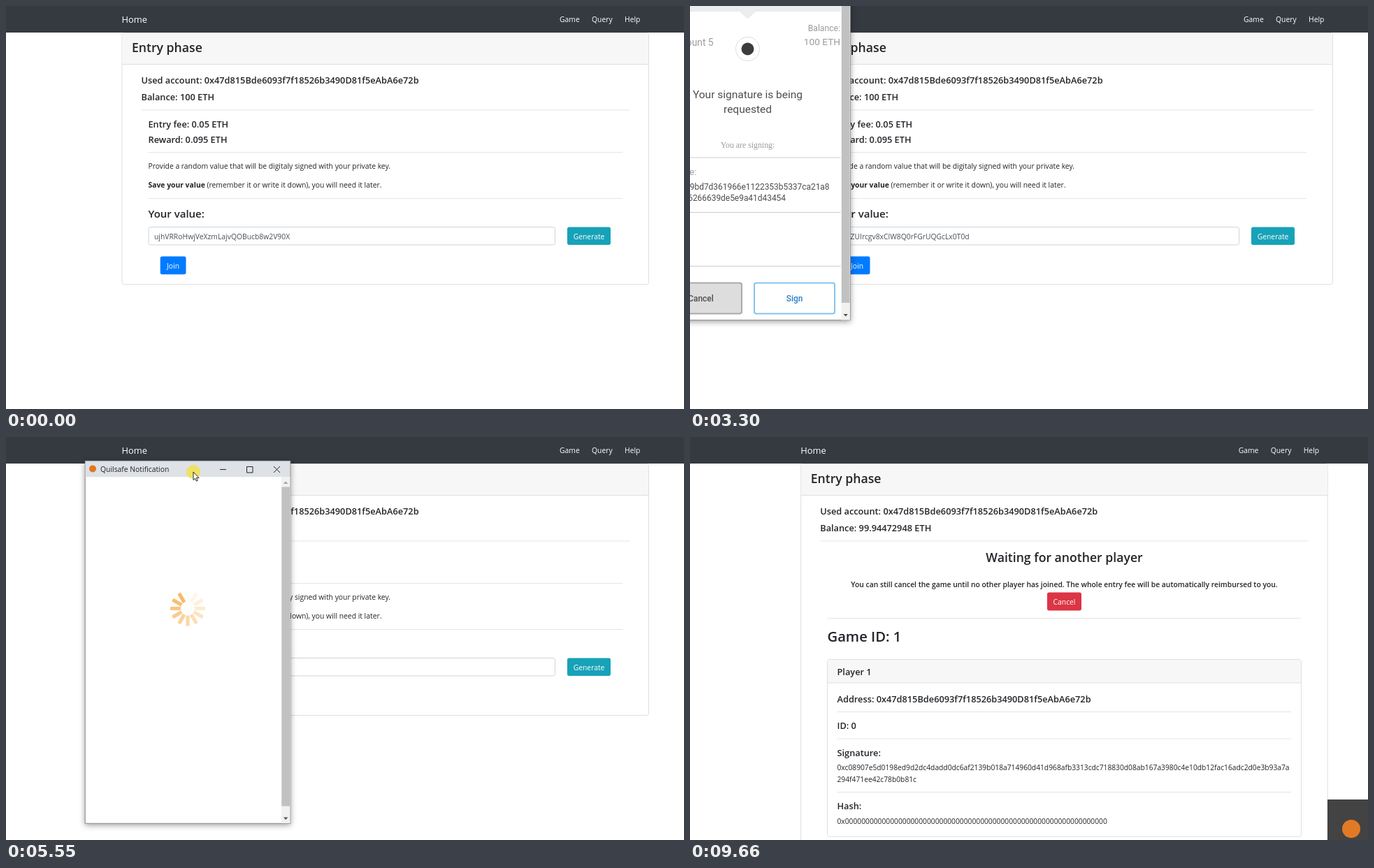
An HTML page that plays this animation: 970 px wide and 577 px high, repeating every 9740 ms.

```html
<!DOCTYPE html>
<html lang="en">
<head>
<meta charset="utf-8">
<title>Entry phase</title>
<style>
html, body { margin: 0; width: 100%; height: 100%; overflow: hidden; background: #fff; }
svg { display: block; width: 970px; height: 577px; }
text { font: 10.35px "Open Sans", "Noto Sans", sans-serif; fill: #212529; white-space: pre; }
.h2 { font-size: 20.2px; font-weight: 600; }
.h3 { font-size: 17.65px; font-weight: 600; }
.h4 { font-size: 15px; font-weight: 600; }
.h5 { font-size: 12.77px; font-weight: 600; }
.h6 { font-weight: 600; }
.hex { font-size: 10.25px; }
.brand { font-size: 12.9px; }
.brand, .light { fill: #fff; }
.field { fill: #495057; }
.bold { font-weight: 700; }
.mid { text-anchor: middle; }
.end { text-anchor: end; }
.panel text { font-family: Roboto, Lato, sans-serif; fill: #4d4d4d; }
.panel .grey { fill: #9b9b9b; }
.panel .serif { font: 11.8px "Liberation Serif", "Noto Serif", serif; fill: #9b9b9b; }
.panel .btn { font-size: 11.9px; font-weight: 500; }
#frame { filter: drop-shadow(0 2px 4px rgba(0, 0, 0, .38)); }
</style>
</head>
<body>
<svg id="stage" viewBox="0 0 970 577"></svg>
<script>
(() => {
const LOOP = 9740;
// Runs of held pictures: start, end, number of pictures
const RUNS = [[100, 2970, 38], [3300, 4910, 22], [5230, 6850, 22], [7170, 9050, 25], [9660, 9660, 1]];
const ADDRESS = '0x47d815Bde6093f7f18526b3490D81f5eAbA6e72b';
const VALUES = [
  [0, 'ujhVRRoHwjVeXzmLajvQOBucb8w2V90X'],
  [700, 'Kd7mTqYwB2sXhRfN0eLzVu5GaPj9CoWi'],
  [1080, 'x3HbZpQ8nUcErT6yMkS1gWvJf4LdAo7D'],
  [1390, 'p5FZUIrcgv8xClW8Q0rFGrUQGcLx0T0d']
];
const POPUPS = [
  { open: 2121, close: 4550, load: 2700, grab: 3300, drop: 3640, x: 64, y: -24.5 },
  { open: 4672, close: 7742, load: 6240, grab: 5250, drop: 5520, x: 113, y: 34 }
];
const START = { x: -64.5, y: -69.5 };
const FADE = 110;
const PATH = [
  [100, 690, 540], [560, 835, 332], [1500, 838, 331], [1760, 520, 392], [2040, 232, 369],
  [2290, 232, 369], [2700, 90.5, -53.5], [3300, 90.5, -53.5], [3640, 219, -8.5], [3980, 285, 490],
  [4070, 285, 490], [4300, 278, 466], [4440, 278, 466], [4700, 90.5, -53.5], [5250, 90.5, -53.5],
  [5520, 268, 50], [5620, 268, 50], [6160, 330, 420], [6850, 340, 470], [7170, 340, 470],
  [7480, 357, 518], [7790, 357, 518], [8100, 900, 430], [8400, 990, 380]
];
const PRESSES = [[700, 790], [1080, 1170], [1390, 1480], [2040, 2120], [3300, 3650], [4330, 4440], [5250, 5610], [7540, 7630]];

const text = (x, y, s, cls = '', extra = '') => `<text x="${x}" y="${y}" class="${cls}" ${extra}>${s}</text>`;
const rect = (x, y, w, h, fill, extra = '') => `<rect x="${x}" y="${y}" width="${w}" height="${h}" fill="${fill}" ${extra}/>`;
const rule = (x1, x2, y, color = '#e4e5e5') => `<path d="M${x1} ${y}H${x2}" stroke="${color}"/>`;
const size = n => `style="font-size:${n}px"`;

function card(x, y, w, h, head) {
  return rect(x, y, w, h, '#fff', 'rx="2.7" stroke="#dfdfdf"') +
    rect(x + .5, y + .5, w - 1, head, '#f7f7f7') + rule(x, x + w, y + head + .5, '#dfdfdf');
}

function pageHead(height, balance) {
  return card(166, 38.5, 753.5, height, 44.5) +
    rect(-10, 0, 990, 38, '#343a40') +
    text(165.5, 24, 'Home', 'brand') +
    text(792, 23, 'Game', 'light') + text(838, 23, 'Query', 'light') + text(885, 23, 'Help', 'light') +
    text(180, 66, 'Entry phase', 'h3') +
    text(193.5, 110.5, 'Used account: ' + ADDRESS, 'h5') +
    text(193.5, 135, `Balance: ${balance} ETH`, 'h5') +
    rule(193.5, 892, 149);
}

function entryForm() {
  return pageHead(360, '100') +
    text(203.5, 173.5, 'Entry fee: 0.05 ETH', 'h5') +
    text(203.5, 195.5, 'Reward: 0.095 ETH', 'h5') +
    rule(203.5, 882, 209.5) +
    text(203.5, 233, 'Provide a random value that will be digitaly signed with your private key.') +
    text(203.5, 260, '<tspan class="bold">Save your value</tspan> (remember it or write it down), you will need it later.') +
    rule(203.5, 882, 275.5) +
    text(203.5, 303, 'Your value:', 'h4') +
    rect(204, 316.5, 581.5, 25.5, '#fff', 'rx="2.7" stroke="#ced4da"') +
    text(212, 333.5, '', 'field', 'id="value"') +
    rect(803, 316.5, 62, 25.5, '#17a2b8', 'id="generate" rx="2.7" stroke-width="3" stroke-opacity=".5"') +
    text(834, 333.5, 'Generate', 'light mid') +
    rect(220.7, 358.5, 36.8, 25.7, '#007bff', 'id="join" rx="2.7" stroke-width="3" stroke-opacity=".5"') +
    text(239, 375.5, 'Join', 'light mid');
}

function waitingPage() {
  return '<g transform="translate(-7.3 0)">' + pageHead(560, '99.94472948') + '</g>' +
    text(535.5, 179, 'Waiting for another player', 'h3 mid') +
    text(535.5, 215, 'You can still cancel the game until no other player has joined. The whole entry fee will be automatically reimbursed to you.', 'h6 mid') +
    rect(511, 222.5, 49, 26, '#dc3545', 'rx="2.7"') + text(535.5, 240, 'Cancel', 'light mid') +
    rule(196.5, 874, 259.5) +
    text(196.5, 293, 'Game ID: 1', 'h2') +
    card(196.5, 318.5, 678, 253.5, 33) +
    text(210.5, 340.5, 'Player 1', 'h5') +
    text(210.5, 379.5, 'Address: ' + ADDRESS, 'h5') + rule(210.5, 860, 393.5) +
    text(210.5, 418, 'ID: 0', 'h5') + rule(210.5, 860, 432) +
    text(210.5, 457, 'Signature:', 'h5') +
    text(210.5, 477, '0xc08907e5d0198ed9d2dc4dadd0dc6af2139b018a714960d41d968afb3313cdc718830d08ab167a3980c4e10db12fac16adc2d0e3b93a7a', 'hex') +
    text(210.5, 494, '294f471ee42c78b0b81c', 'hex') + rule(210.5, 860, 508.5) +
    text(210.5, 533, 'Hash:', 'h5') +
    text(210.5, 554, '0x' + '0'.repeat(64), 'hex');
}

function panel(id, title, body, no, yes) {
  return `<g id="${id}" class="panel" transform="translate(-64 24.5)">` +
    rect(64, -1.5, 280, 54.5, '#e9edf0') +
    '<path d="M199 52.5H223L211 63.5Z" fill="#e9edf0"/>' +
    text(211, 33, title, 'mid', size(19)) +
    text(78, 81, 'Account:', 'grey', size(12.2)) +
    text(343.5, 81, 'Balance:', 'grey end', size(12.2)) +
    '<circle cx="86" cy="97" r="8" fill="#f5980f"/><path d="M79 93A8 8 0 0 1 88 89.5Q82 90 79 93Z" fill="#1f8ccf"/>' +
    text(100, 101.5, 'Account 5', 'grey', size(13.75)) +
    text(343.5, 101, '100 ETH', 'grey end', size(13.65)) +
    '<circle cx="211" cy="106.5" r="17" fill="#fff" stroke="#dcdcdc"/><circle cx="211" cy="106.5" r="9" fill="#3c3c3d"/>' +
    body + rule(64, 344, 417.5, '#ccc') +
    rect(86.5, 441.5, 116, 44, '#ddd', 'rx="3" stroke="#aaa" stroke-width="2"') +
    text(144, 467.5, no, 'btn mid') +
    rect(220.5, 441.5, 115, 44, '#fff', 'rx="3" stroke="#85c4ee" stroke-width="2"') +
    text(278, 467.5, yes, 'btn mid', 'style="fill:#2a82cb"') + '</g>';
}

const signBody =
  text(211, 177, 'Your signature is being', 'mid', size(15.5)) +
  text(211, 197.5, 'requested', 'mid', size(15.5)) +
  text(211, 248, 'You are signing:', 'serif mid') + rule(64, 344, 262, '#ccc') +
  text(79, 287, 'Message:', 'grey', size(13.7)) +
  text(79, 308, '0xfc32e89bd7d361966e1122353b5337ca21a8', '', size(11.93)) +
  text(79, 324, '0a1d9536266639de5e9a41d43454', '', size(11.93)) + rule(64, 344, 340.5, '#ccc');

const payBody =
  text(211, 187, '0.05 ETH', 'mid', size(19)) + rule(64, 344, 262, '#ccc');

function spinnerBars() {
  const bar = (_, i) => `<rect x="-2.6" y="-25" width="5.2" height="15" rx="1" fill="#f5a63c" transform="rotate(${i * 30})"/>`;
  return '<g id="spinner" transform="translate(147 211.5)">' + Array.from({ length: 12 }, bar).join('') + '</g>';
}

function popupWindow() {
  return '<g id="popup">' +
    rect(.25, .25, 293.5, 519, '#fff', 'id="frame" stroke="#8a8a8a"') +
    '<g id="inside">' +
    rect(.7, .7, 292.6, 22.5, '#dee1e6') +
    '<circle cx="11" cy="11.5" r="5" fill="#e2761b"/>' +
    text(22, 15.5, 'Quilsafe Notification') +
    '<path d="M193 12.5H202M231.5 8.5H240V17H231.5ZM270 8L279 17M279 8L270 17" fill="none" stroke="#222"/>' +
    rect(281, 23, 12.5, 496, '#f1f1f1') + rect(281.3, 37.5, 11.7, 457, '#c1c1c1') +
    '<path d="M284 33L287.2 29.5 290.4 33Z" fill="#a3a3a3"/><path d="M284 510.5L287.2 514 290.4 510.5Z" fill="#505050"/>' +
    spinnerBars() +
    panel('panel0', 'Signature Request', signBody, 'Cancel', 'Sign') +
    panel('panel1', 'Confirm Transaction', payBody, 'Reject', 'Confirm') +
    '</g></g>';
}

document.getElementById('stage').innerHTML =
  `<g id="form">${entryForm()}</g><g id="waiting">${waitingPage()}</g>` +
  '<g id="toast">' + rect(0, 519, 60, 58, '#434343') + '<circle id="badge" cx="34" cy="561" r="13" fill="#e27a25"/></g>' +
  popupWindow() +
  '<g id="cursor"><circle id="press" r="10" fill="#f2e04a" opacity=".85"/>' +
  '<path id="arrow" d="M0 0V11.6L2.6 9.3 4.4 13.2 6.2 12.4 4.5 8.6H8Z" fill="#fff" stroke="#111" stroke-width=".9"/>' +
  '<path id="resize" d="M-8 0L-4.5 -3.5V-1H4.5V-3.5L8 0 4.5 3.5V1H-4.5V3.5Z" fill="#fff" stroke="#111" stroke-width=".9"/></g>';

const el = {};
document.querySelectorAll('[id]').forEach(n => { el[n.id] = n; });
const set = (n, name, v) => n.setAttribute(name, v);
const show = (n, on) => set(n, 'visibility', on ? 'inherit' : 'hidden');
const clamp = v => Math.max(0, Math.min(1, v));
const mix = (a, b, k) => a + (b - a) * k;
const ease = k => k * k * (3 - 2 * k);

function snap(t) {
  let held = 0;
  for (const [from, to, n] of RUNS) {
    if (t < from) break;
    const step = (to - from) / (n - 1) || 1;
    held = from + Math.min(n - 1, Math.floor((t - from) / step + 1e-6)) * step;
  }
  return held;
}

function pointer(t) {
  const i = PATH.findIndex(p => p[0] > t);
  if (i < 1) return PATH[i ? PATH.length - 1 : 0].slice(1);
  const [t0, x0, y0] = PATH[i - 1], [t1, x1, y1] = PATH[i];
  const k = ease((t - t0) / (t1 - t0));
  return [mix(x0, x1, k), mix(y0, y1, k)];
}

function drawPopup(t) {
  const i = POPUPS.findIndex(p => t > p.open && t < p.close), p = POPUPS[i];
  show(el.popup, p);
  if (!p) return;
  const closing = t > p.close - FADE;
  const alpha = clamp((closing ? p.close - t : t - p.open) / FADE);
  const scale = 1 - (closing ? .047 : .034) * (1 - alpha);
  const k = ease(clamp((t - p.grab) / (p.drop - p.grab)));
  const x = mix(START.x, p.x, k) + 147, y = mix(START.y, p.y, k) + 259.75;
  set(el.popup, 'transform', `translate(${x} ${y}) scale(${scale}) translate(-147 -259.75)`);
  set(el.popup, 'opacity', alpha);
  show(el.inside, alpha === 1);
  const loaded = t >= p.load;
  show(el.spinner, !loaded);
  show(el.panel0, loaded && i === 0);
  show(el.panel1, loaded && i === 1);
  const head = Math.floor(t * 12 / 1000) + 5;
  [...el.spinner.children].forEach((bar, j) => {
    const age = (((head - j) % 12) + 12) % 12;
    set(bar, 'opacity', .78 - age * .068);
  });
}

function render(time) {
  const t = snap(time);
  const done = t >= 8200;
  show(el.form, !done);
  show(el.waiting, done);
  el.value.textContent = VALUES.filter(v => t >= v[0]).pop()[1];

  const [x, y] = pointer(t);
  const over = (l, r, a, b) => t >= 100 && x > l && x < r && y > a && y < b;
  set(el.generate, 'fill', over(803, 865, 316, 342) ? '#138496' : '#17a2b8');
  set(el.generate, 'stroke', t >= 700 && t < 2040 ? '#17a2b8' : 'none');
  set(el.join, 'fill', t < 2121 && over(220, 258, 358, 385) ? '#0069d9' : '#007bff');
  set(el.join, 'stroke', (t >= 2040 && t < 2121) || t >= 7632 ? '#007bff' : 'none');

  drawPopup(t);

  const resizing = t > 2121 && t < 2290;
  show(el.cursor, t >= 100 && t < 8400);
  set(el.cursor, 'transform', `translate(${x} ${y})`);
  show(el.arrow, !resizing);
  show(el.resize, resizing);
  show(el.press, PRESSES.some(([a, b]) => t >= a && t < b));

  const slide = 1 - (1 - clamp((t - 8650) / 390)) ** 2;
  set(el.toast, 'transform', `translate(${mix(970, 912, slide)} 0)`);
  show(el.toast, slide > 0);
  show(el.badge, t >= 9660);
}

const begin = performance.now();
function tick() {
  render((performance.now() - begin) % LOOP);
  requestAnimationFrame(tick);
}
tick();
})();
</script>
</body>
</html>
```
